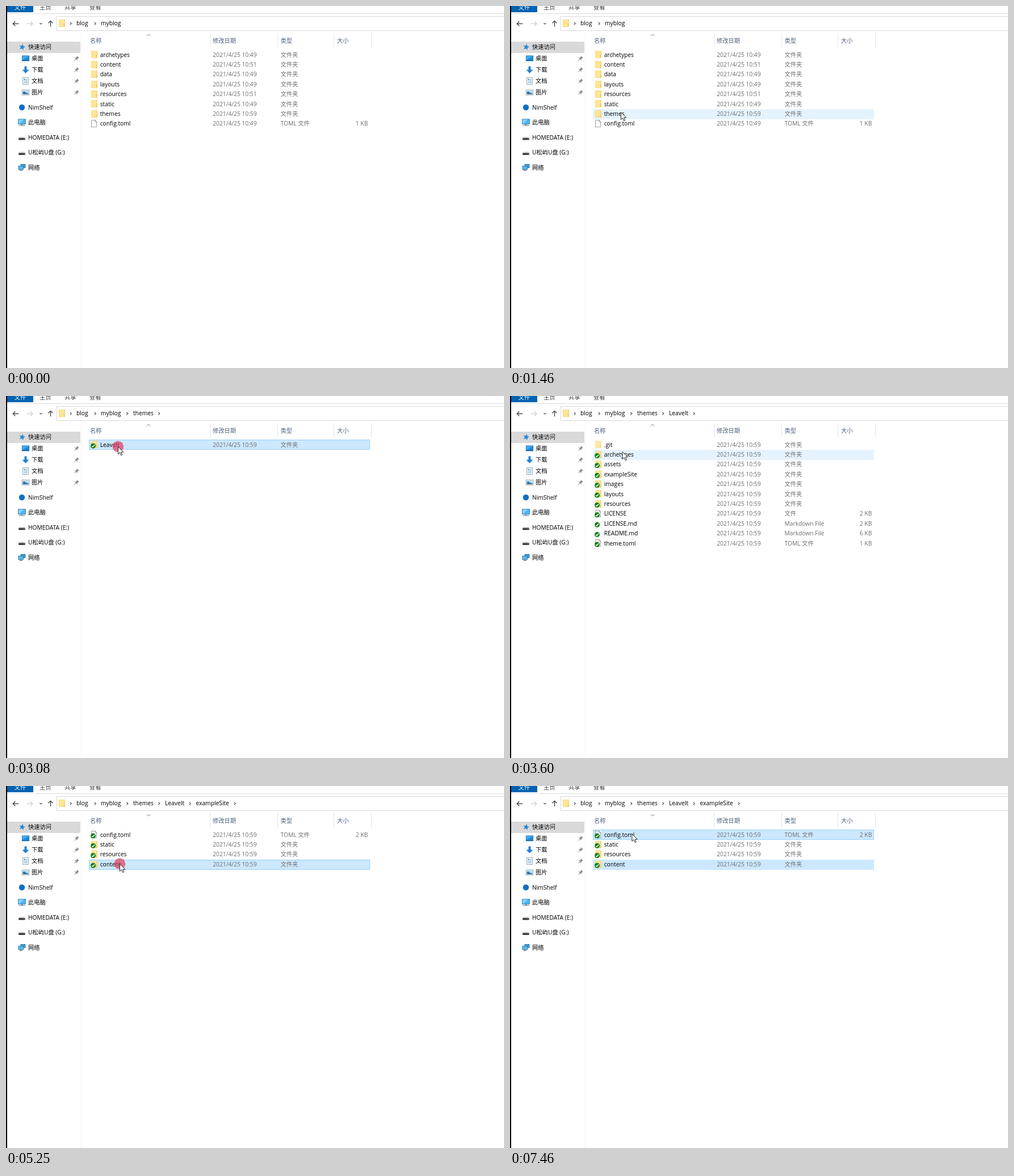
Recreate the animation shown at these times as an HTML page with a canvas. Size 877 by 639 pixels, loop 8 s.

```html
<!DOCTYPE html>
<html lang="zh-CN">
<head>
<meta charset="utf-8">
<title>File browser</title>
<style>
html, body { margin: 0; width: 100%; height: 100%; overflow: hidden; background: #fff; }
canvas { display: block; }
</style>
</head>
<body>
<canvas id="stage" width="877" height="639"></canvas>
<script>
const ctx = document.getElementById('stage').getContext('2d');
const LOOP = 8000;
const FONT = '10.25px "Open Sans", "Noto Sans CJK SC", "Noto Sans CJK", sans-serif';
const ROW_TOP = 77.3, ROW_H = 17.4;

const folder = (name, time = '10:59', icon = 'folder') => ({ name, time, icon, type: '文件夹', size: '' });
const file = (name, type, size, icon = 'doc', time = '10:59') => ({ name, time, icon, type, size });

const SCENES = [
  { start: 0, path: ['blog', 'myblog'], items: [
    folder('archetypes', '10:49'), folder('content', '10:51'), folder('data', '10:49'),
    folder('layouts', '10:49'), folder('resources', '10:51'), folder('static', '10:49'),
    folder('themes'), file('config.toml', 'TOML 文件', '1 KB', 'doc', '10:49')] },
  { start: 1990, chevron: 2220, git: true, path: ['blog', 'myblog', 'themes'],
    items: [folder('LeaveIt')] },
  { start: 3370, chevron: 3600, git: true, path: ['blog', 'myblog', 'themes', 'LeaveIt'], items: [
    folder('.git', '10:59', 'hidden'), folder('archetypes'), folder('assets'), folder('exampleSite'),
    folder('images'), folder('layouts'), folder('resources'), file('LICENSE', '文件', '2 KB'),
    file('LICENSE.md', 'Markdown File', '2 KB', 'none'), file('README.md', 'Markdown File', '6 KB', 'none'),
    file('theme.toml', 'TOML 文件', '1 KB')] },
  { start: 4790, chevron: 4950, git: true, descending: true,
    path: ['blog', 'myblog', 'themes', 'LeaveIt', 'exampleSite'],
    items: [file('config.toml', 'TOML 文件', '2 KB'), folder('static'), folder('resources'), folder('content')] }
];
const CRUMB_X = [124, 167, 224, 280, 334.5];
const CHEVRON_X = [114, 157, 213.5, 269.5, 324, 403];

// first step, last step, step count, end point, easing power
const POINTER_START = [290, 636];
const MOVES = [
  [460, 1220, 11, 197, 195, 2],
  [1290, 1460, 3, 195, 187, 1],
  [2370, 2850, 7, 197, 89, 1.6],
  [3600, 4160, 8, 200, 137, 1.5],
  [5630, 5792, 3, 206, 158, 1],
  [5873, 6200, 5, 220, 95.2, 1.2],
  [6290, 6360, 2, 216, 89, 1],
  [6440, 6510, 2, 215, 84, 1],
  [6680, 6680, 1, 214.5, 84, 1]
];
const CLICKS = [[1680, 1760], [1840, 1910], [3080, 3140], [3220, 3300],
  [4460, 4610], [4700, 4790], [5250, 5330], [7290, 7460]];
// from, to, row, framed
const SELECTED = [[1680, 1990, 6, true], [3080, 3370, 0, true], [4460, 4790, 3, true],
  [5250, 7290, 3, true], [7290, 8000, 3, false], [7290, 8000, 0, true]];

const within = (t, [from, to]) => t >= from && t < to;

function pointerAt(t) {
  let [x, y] = POINTER_START;
  for (const [t0, t1, n, ex, ey, pow] of MOVES) {
    if (t < t0) break;
    const step = t >= t1 ? n : 1 + Math.floor((t - t0) / (t1 - t0) * (n - 1));
    const p = 1 - Math.pow(1 - step / n, pow);
    x += (ex - x) * p;
    y += (ey - y) * p;
    if (step < n) break;
  }
  return [x, y];
}

function rect(x, y, w, h, color) {
  ctx.fillStyle = color;
  ctx.fillRect(x, y, w, h);
}
function box(x, y, w, h, fill, stroke, width = 0.8) {
  rect(x, y, w, h, fill);
  ctx.strokeStyle = stroke;
  ctx.lineWidth = width;
  ctx.strokeRect(x, y, w, h);
}
function trace(points) {
  ctx.beginPath();
  for (let i = 0; i < points.length; i += 2) ctx.lineTo(points[i], points[i + 1]);
}
function line(color, width, ...points) {
  trace(points);
  ctx.strokeStyle = color;
  ctx.lineWidth = width;
  ctx.stroke();
}
function poly(color, ...points) {
  trace(points);
  ctx.closePath();
  ctx.fillStyle = color;
  ctx.fill();
}
function disc(x, y, r, color) {
  ctx.beginPath();
  ctx.arc(x, y, r, 0, Math.PI * 2);
  ctx.fillStyle = color;
  ctx.fill();
}
function text(s, x, y, color = '#000', align = 'left') {
  ctx.fillStyle = color;
  ctx.textAlign = align;
  ctx.fillText(s, x, y);
}
// draws with the origin moved to x, y
function at(x, y, draw, angle = 0) {
  ctx.save();
  ctx.translate(x, y);
  ctx.rotate(angle);
  draw();
  ctx.restore();
}

function folderIcon(x, y) {
  rect(x, y, 11, 13, '#f3d57d');
  rect(x + 0.6, y + 0.6, 8.9, 11.8, '#ffe594');
  rect(x + 8.8, y + 7, 0.8, 5.5, '#e3bd55');
}
function docIcon(x, y) {
  box(x + 0.5, y + 0.5, 9, 12, '#fff', '#8a8a8a');
  poly('#fff', x + 7, y - 0.2, x + 10.4, y - 0.2, x + 10.4, y + 3.2);
  line('#8a8a8a', 0.8, x + 6.8, y + 0.5, x + 6.8, y + 3.2, x + 9.5, y + 3.2, x + 6.8, y + 0.5);
}
function tickBadge(x, y) {
  disc(x, y, 4.5, '#0b7d13');
  line('#fff', 1.5, x - 2.4, y + 0.3, x - 0.7, y + 2, x + 2.6, y - 2);
}
// points right at angle 0
function chevron(x, y, angle, depth, spread, color, width = 1.1) {
  at(x, y, () => line(color, width, -depth, -spread, depth, 0, -depth, spread), angle);
}
const crumbChevron = x => chevron(x, 31, 0, 1.2, 2.4, '#444');

function arrow(x, y, angle, color, len = 10) {
  at(x, y, () => {
    line(color, 1.3, len / 2, 0, -len / 2, 0);
    line(color, 1.3, -len / 2 + 4, -4, -len / 2, 0, -len / 2 + 4, 4);
  }, angle);
}
function pin(x, y) {
  at(x, y, () => {
    rect(-2.3, -4.4, 4.6, 1.3, '#7d858d');
    rect(-1.5, -3.4, 3, 3.4, '#7d858d');
    rect(-3, -0.4, 6, 1.3, '#7d858d');
    rect(-0.4, 0.8, 0.9, 4, '#7d858d');
  }, Math.PI / 4);
}
function star() {
  const points = [];
  for (let i = 0; i < 10; i++) {
    const r = i % 2 ? 2.5 : 5.6, a = i * Math.PI / 5 - 1.35;
    points.push(r * Math.cos(a), r * Math.sin(a));
  }
  poly('#2589d8', ...points);
}
function monitor() {
  box(-6.4, -5.5, 12.8, 8.8, '#4db4f0', '#2674a6');
  poly('#83d0fa', -5.8, -5, 3, -5, -4, 2.8, -5.8, 2.8);
  rect(-1.2, 3.5, 2.4, 1.8, '#718a9c');
  rect(-5.6, 5.2, 11.2, 1, '#5c7180');
}
function drive() {
  poly('#c9c9c9', -4.5, -0.8, 4.5, -0.8, 5.8, 1.6, -5.8, 1.6);
  rect(-5.8, 1.4, 11.6, 3.2, '#333');
  rect(3.4, 2.6, 1.3, 0.8, '#b5d6b5');
}
function network() {
  box(-2, -5.4, 8, 6, '#3d9fdd', '#226c9c');
  box(-6, -2.4, 8.6, 6.4, '#57b9f1', '#226c9c');
  rect(-3, 4.2, 2.4, 1.4, '#5c7180');
  rect(-4.8, 5.4, 6.2, 0.8, '#5c7180');
}
function desktop() {
  box(-6.2, -4.6, 12.4, 9, '#1c8bdd', '#1369ab');
  poly('#45a9ec', -5.8, -4.2, 5.8, -4.2, -5.8, 3);
  rect(-5.8, 3, 11.6, 1, '#0d5690');
}
function download() {
  poly('#2180d0', -2, -6, 2, -6, 2, 0, 6, 0, 0, 6.2, -6, 0, -2, 0);
}
function textPage() {
  box(-4.8, -6, 9.6, 12, '#fff', '#78909f');
  rect(-3, -3.8, 2.6, 2.6, '#4a9bd4');
  for (let i = 0; i < 4; i++) rect(i < 2 ? 0.4 : -3, -3.5 + i * 2.1, i < 2 ? 2.8 : 6.2, 0.9, '#5f9dc6');
}
function picture() {
  box(-6.2, -4.4, 12.4, 9, '#fff', '#7d8d98');
  rect(-4.8, -3, 9.6, 6.2, '#a4d8f3');
  poly('#2c6e9e', -4.8, 3.2, -4.8, -1, -2, -1.4, 1, 1, 4.8, 1.4, 4.8, 3.2);
}

// label, centre height, icon, icon centre, pinned
const SIDEBAR = [
  ['快速访问', 72.5, star, 28.5], ['桌面', 92.5, desktop, 34.5, true],
  ['下载', 112.5, download, 34.5, true], ['文档', 132.5, textPage, 34.5, true],
  ['图片', 152.5, picture, 34.5, true],
  ['NimShelf', 179, () => disc(0, 0, 5.2, '#0f6fc6'), 28],
  ['此电脑', 205.3, monitor, 28], ['HOMEDATA (E:)', 231.8, drive, 28],
  ['U松屿U盘 (G:)', 258.3, drive, 28], ['网络', 284.8, network, 28]
];

function drawChrome(scene, t) {
  rect(0, 0, 877, 639, '#fff');
  rect(2, 0, 46, 11, '#0063b1');
  text('文件', 25, 6, '#fff', 'center');
  ['主页', '共享', '查看'].forEach((s, i) => text(s, 59 + i * 44, 6, '#333'));
  rect(2, 13, 875, 1, '#dcdddd');

  arrow(17.3, 31.3, 0, '#3c3c3c');
  arrow(42, 31.3, Math.PI, '#cfcfcf');
  chevron(61.5, 31, Math.PI / 2, 1, 2.1, '#555');
  arrow(78.5, 31.3, Math.PI / 2, '#3c3c3c');
  ctx.strokeStyle = '#d9d9d9';
  ctx.lineWidth = 1;
  ctx.strokeRect(89.5, 18.5, 800, 25);
  folderIcon(93, 24);

  const { path } = scene;
  path.forEach((name, i) => {
    crumbChevron(CHEVRON_X[i]);
    text(name, CRUMB_X[i], 34.3);
  });
  if (t >= scene.chevron) crumbChevron(CHEVRON_X[path.length]);

  [['名称', 148], ['修改日期', 364], ['类型', 483.5], ['大小', 583]]
    .forEach(([s, x]) => text(s, x, 64.8, '#4c607a'));
  [359, 478, 577, 643].forEach(x => rect(x, 48, 1, 25, '#e4e4e4'));
  chevron(251, 51.5, scene.descending ? Math.PI / 2 : -Math.PI / 2, 1.6, 3.4, '#777', 0.9);
}

function drawSidebar() {
  rect(132, 47, 1, 592, '#f3f3f3');
  rect(2, 63, 129, 20, '#d9d9d9');
  for (const [label, y, icon, x, pinned] of SIDEBAR) {
    at(x, y, icon);
    text(label, pinned ? 45 : 39, y + 3.7);
    if (pinned) pin(123.8, y + 0.6);
  }
  rect(0, 0, 2, 639, '#000');
}

function drawRows(scene, t, pointer) {
  const hover = t >= 460 ? Math.floor((pointer[1] - ROW_TOP) / ROW_H) : -1;
  const selection = SELECTED.filter(s => within(t, s));
  scene.items.forEach((item, i) => {
    const exact = ROW_TOP + i * ROW_H, top = Math.round(exact), base = exact + 12.3;
    const chosen = selection.find(s => s[2] === i);
    if (chosen) {
      rect(146, top, 495, 18, '#cce8ff');
      if (chosen[3]) {
        ctx.strokeStyle = '#99d1ff';
        ctx.lineWidth = 1;
        ctx.strokeRect(146.5, top + 0.5, 494, 17);
      }
    } else if (i === hover) rect(146, top, 495, 18, '#e5f3ff');

    if (item.icon === 'doc') docIcon(150, top + 2);
    else if (item.icon !== 'none') {
      ctx.globalAlpha = item.icon === 'hidden' ? 0.5 : 1;
      folderIcon(150, top + 2);
      ctx.globalAlpha = 1;
    }
    if (scene.git && item.icon !== 'hidden') tickBadge(153.5, exact + 10.7);

    text(item.name, 165.7, base);
    text('2021/4/25 ' + item.time, 364.2, base, '#6d6d6d');
    text(item.type, 483.6, base, '#6d6d6d');
    text(item.size, 637.3, base, '#6d6d6d', 'right');
  });
}

function drawPointer(t, [x, y]) {
  if (t < 460) return;
  if (CLICKS.some(c => within(t, c))) disc(x + 0.3, y + 0.2, 9.8, 'rgba(226, 52, 84, 0.68)');
  at(x, y, () => {
    const shape = [0.4, 0.6, 0.4, 13.6, 3.4, 10.8, 5.6, 15.7, 7.7, 14.8, 5.6, 10.1, 9.7, 10.1];
    poly('#fff', ...shape);
    ctx.strokeStyle = '#111';
    ctx.lineWidth = 0.9;
    ctx.stroke();
  });
}

function draw(t) {
  const scene = SCENES.filter(s => t >= s.start).pop();
  const pointer = pointerAt(t);
  ctx.font = FONT;
  drawChrome(scene, t);
  drawSidebar();
  drawRows(scene, t, pointer);
  drawPointer(t, pointer);
}

const began = performance.now();
function tick() {
  draw((performance.now() - began) % LOOP);
  requestAnimationFrame(tick);
}
tick();
</script>
</body>
</html>
```
